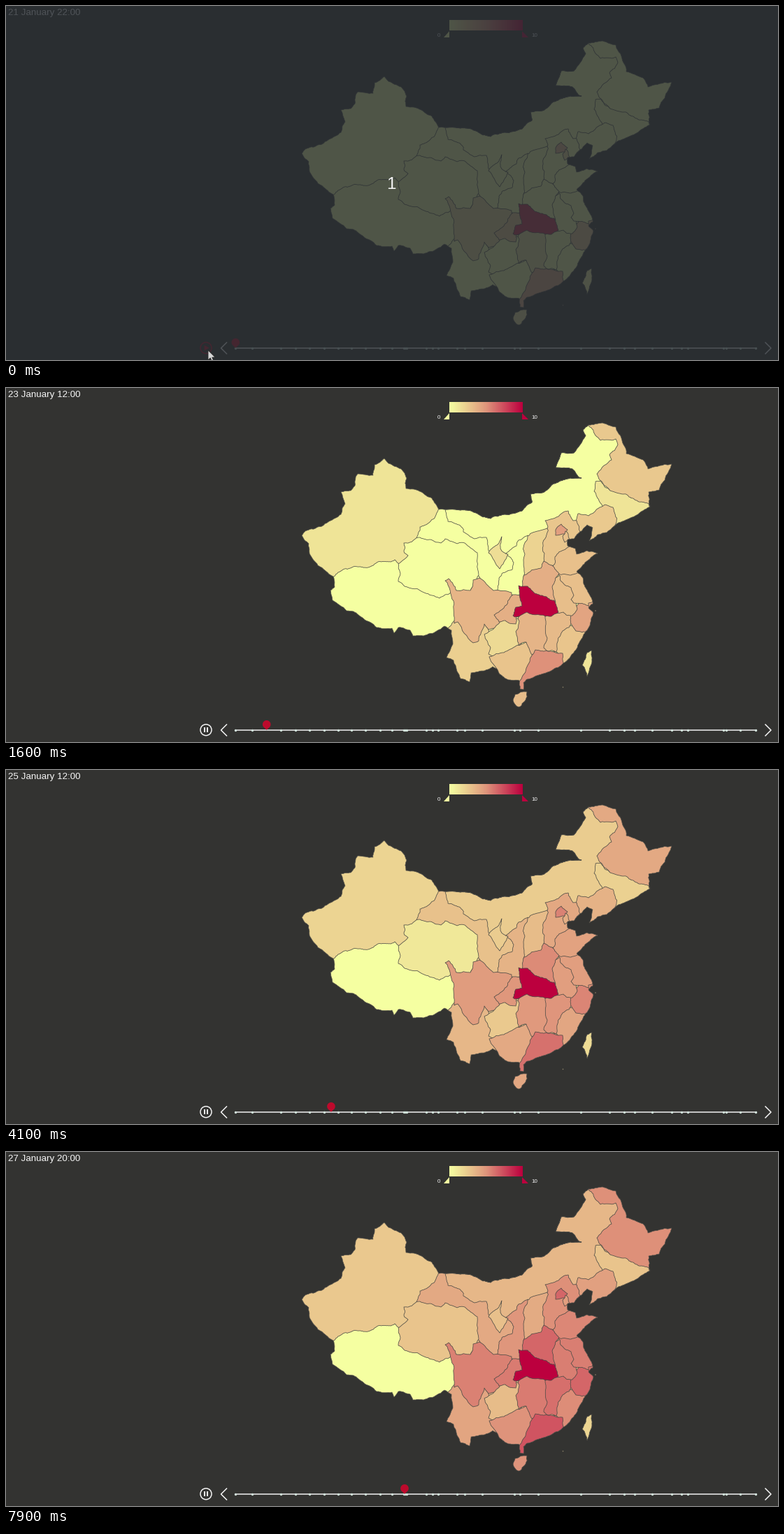
Recreate the animation shown at these times as a matplotlib script. Size 1104x507 px, loop 8 s.

```python
import numpy as np
import matplotlib.pyplot as plt
from matplotlib.animation import FuncAnimation
from matplotlib.colors import LinearSegmentedColormap
from matplotlib.patches import Circle, Polygon, Rectangle

W, H, DPI = 1104, 507, 64
PX = 72 / DPI
STEP_MS, FRAMES = 100, 80
BG, WHITE, RED, BORDER = "#333331", "#f4f4f4", "#bd0a2c", "#4b4a45"
INTRO = 2  # frames under the dark overlay

rng = np.random.default_rng(4)
CMAP = LinearSegmentedColormap.from_list("cases", ["#f5ffa1", "#df967c", "#bc003e"], N=512)

# Each move starts at a frame and carries the marker to an hour.
STARTS = (9, 15, 22, 27, 34, 40, 45, 53, 59, 65, 72, 78)
HOURS = (14, 38, 50, 62, 74, 86, 97, 109, 121, 131, 141, 142)
MOVE_STEPS = 3
LAST_HOUR = HOURS[-1]

# Key points of the mainland outline, clockwise from the western end
NORTH = [
    (423, 211), (428, 205), (446, 199), (462, 191), (479, 181), (485, 166),
    (479, 149), (493, 147), (499, 140), (503, 123), (525, 125), (527, 110),
    (541, 101), (547, 108), (565, 116), (573, 129), (572, 144), (594, 149),
    (609, 158), (619, 174), (650, 175), (665, 176), (679, 183), (693, 187),
    (713, 181), (738, 176), (752, 164), (750, 152), (767, 150), (777, 143),
    (791, 134), (807, 129), (823, 129), (810, 116), (786, 114), (794, 93),
    (812, 93), (829, 68), (825, 60), (833, 53)]
EAST = [
    (853, 50), (872, 56), (880, 72), (887, 94), (911, 103), (918, 116),
    (936, 111), (952, 109), (942, 132), (934, 146), (919, 149), (921, 170),
    (907, 178), (893, 186), (874, 194), (859, 207), (846, 210), (834, 219),
    (839, 200), (831, 196), (820, 207), (812, 216), (803, 217), (803, 226),
    (814, 230), (816, 238), (831, 233), (846, 237), (828, 250), (816, 263),
    (825, 272), (830, 288), (838, 303), (839, 309), (833, 315), (840, 322),
    (835, 340), (826, 353), (819, 366), (813, 377), (797, 394)]
SOUTH = [
    (790, 400), (772, 408), (753, 415), (740, 422), (740, 432), (735, 431),
    (734, 419), (719, 418), (708, 411), (702, 402), (696, 399), (684, 405),
    (665, 408), (663, 421), (650, 416), (644, 402), (640, 390), (630, 386),
    (639, 367), (637, 347), (627, 341), (611, 351), (597, 355), (582, 355),
    (578, 347), (561, 343), (555, 351), (552, 344), (530, 343), (511, 330),
    (497, 320), (487, 319), (467, 304), (464, 290), (470, 285), (468, 270),
    (446, 254), (434, 237), (433, 223)]
HAINAN = [(728, 439), (745, 435), (744, 444), (738, 452), (733, 457), (725, 447)]
TAIWAN = [(838, 376), (838, 391), (831, 413), (824, 397), (831, 379)]

# Provinces from back to front: hour of the first case, final value, key points.
# They overlap the ones behind them and are clipped at the mainland outline.
PROVINCES = {
    "Xinjiang": (16, 2.6, [
        (619, 174), (619, 90), (415, 90), (415, 275), (480, 280), (575, 275),
        (620, 215), (625, 190)]),
    "Gansu": (40, 4.1, [
        (619, 172), (628, 173), (632, 191), (648, 196), (654, 206), (670, 216),
        (687, 214), (690, 233), (728, 240), (730, 255), (712, 291), (695, 294),
        (640, 228), (590, 225), (586, 217), (592, 199), (613, 186)]),
    "Tibet": (0, 0, [
        (469, 270), (482, 260), (505, 256), (518, 257), (532, 249), (556, 246),
        (575, 270), (620, 285), (645, 290), (650, 330), (640, 346), (620, 370),
        (455, 370), (455, 275)]),
    "Qinghai": (80, 2.8, [
        (569, 222), (590, 214), (606, 217), (622, 222), (628, 216), (656, 222),
        (674, 236), (676, 268), (664, 291), (640, 290), (628, 296), (620, 301),
        (598, 293), (570, 284), (561, 277), (564, 266), (561, 252), (575, 240),
        (569, 234)]),
    "Shaanxi": (42, 5, [
        (746, 211), (755, 225), (755, 290), (728, 298), (703, 290), (709, 266),
        (724, 260), (726, 250), (715, 237), (730, 226), (733, 218)]),
    "Ningxia": (10, 3, [
        (709, 213), (707, 230), (718, 238), (711, 252), (706, 259), (690, 236),
        (702, 225)]),
    "Heilongjiang": (15, 5.2, [
        (835, 56), (830, 45), (960, 45), (955, 150), (919, 170), (880, 165),
        (851, 133), (845, 123), (866, 103), (863, 96), (875, 81), (872, 73),
        (850, 75)]),
    "Jilin": (20, 2.8, [
        (843, 134), (851, 134), (864, 147), (883, 152), (905, 163), (919, 166),
        (930, 185), (875, 205), (855, 172), (841, 148)]),
    "Liaoning": (4, 4.5, [
        (814, 195), (818, 180), (833, 183), (857, 167), (868, 171), (873, 192),
        (865, 225), (820, 225)]),
    "Hebei": (12, 5.2, [
        (771, 190), (790, 184), (804, 176), (811, 190), (816, 190), (821, 206),
        (810, 224), (800, 240), (784, 254), (766, 252), (764, 215), (775, 199)]),
    "Shanxi": (11, 4, [
        (774, 201), (768, 225), (770, 237), (768, 256), (760, 268), (740, 270),
        (742, 238), (741, 224), (746, 212), (764, 204)]),
    "Beijing": (-33, 6.6, [
        (786, 203), (794, 195), (803, 203), (799, 209), (786, 211)]),
    "Tianjin": (-14, 4.6, [
        (800, 205), (804, 209), (806, 217), (799, 221), (796, 212)]),
    "Yunnan": (11, 4.3, [
        (634, 342), (650, 325), (680, 328), (706, 382), (706, 402), (690, 430),
        (615, 430), (615, 380), (630, 352)]),
    "Sichuan": (-7, 5.7, [
        (633, 273), (644, 290), (664, 290), (668, 275), (677, 272), (697, 290),
        (723, 293), (726, 310), (712, 340), (690, 346), (684, 338), (676, 362),
        (668, 365), (646, 335), (641, 337), (640, 305), (628, 276)]),
    "Guizhou": (7, 3.2, [
        (684, 353), (698, 344), (709, 331), (736, 331), (737, 368), (728, 379),
        (704, 387), (690, 381), (693, 372)]),
    "Guangxi": (7, 5.1, [
        (691, 385), (712, 379), (730, 369), (745, 364), (760, 375), (753, 395),
        (742, 416), (737, 425), (705, 425), (702, 403), (698, 397)]),
    "Hunan": (-3, 5.9, [
        (732, 329), (745, 316), (775, 324), (779, 357), (772, 382), (752, 382),
        (744, 364), (733, 368), (729, 349)]),
    "Fujian": (12, 5.3, [
        (800, 338), (815, 343), (840, 345), (840, 360), (815, 395), (794, 400),
        (794, 382), (783, 377), (788, 355)]),
    "Guangdong": (-43, 7.2, [
        (757, 375), (773, 376), (796, 380), (799, 400), (790, 420), (735, 440),
        (733, 424), (738, 414), (752, 383)]),
    "Jiangxi": (12, 6.3, [
        (771, 326), (789, 318), (799, 318), (813, 326), (805, 343), (796, 348),
        (787, 378), (773, 376), (769, 372), (774, 358)]),
    "Zhejiang": (-18, 6.6, [
        (813, 316), (822, 306), (850, 306), (850, 347), (824, 350), (815, 348),
        (808, 338), (808, 326)]),
    "Anhui": (11, 5.8, [
        (785, 272), (792, 268), (803, 276), (815, 285), (815, 306), (817, 316),
        (810, 326), (797, 321), (786, 322), (782, 303), (778, 290)]),
    "Jiangsu": (12, 5.8, [
        (790, 265), (810, 263), (818, 260), (840, 270), (845, 307), (830, 311),
        (812, 308), (808, 303), (812, 297), (808, 286), (799, 282)]),
    "Shanghai": (-23, 6.2, [(833, 308), (845, 304), (845, 314), (834, 315)]),
    "Shandong": (8, 5.5, [
        (782, 255), (785, 242), (800, 231), (808, 222), (855, 228), (845, 250),
        (822, 264), (808, 268), (789, 267)]),
    "Henan": (2, 6.6, [
        (769, 248), (783, 256), (791, 266), (781, 285), (786, 307), (755, 302),
        (738, 286), (741, 268), (765, 258)]),
    "Chongqing": (-15, 5.9, [
        (725, 296), (742, 295), (742, 318), (730, 328), (729, 338), (714, 333),
        (705, 335), (698, 325), (712, 315)]),
    "Hubei": (-75, 13, [
        (733, 283), (741, 284), (756, 294), (773, 299), (784, 304), (790, 321),
        (780, 327), (763, 325), (745, 321), (730, 328), (725, 326), (729, 314),
        (738, 312), (734, 291)]),
}


def rough(points, amount=0.07):
    """Fractal outline: keep halving each edge and push its middle sideways."""
    pts = np.array(points, float)
    while True:
        edge = np.roll(pts, -1, axis=0) - pts
        length = np.hypot(*edge.T)
        if length.max() < 5:
            return pts
        push = rng.normal(0, amount, len(pts)) * np.minimum(length, 16)
        push[length < 3] = 0
        normal = np.c_[-edge[:, 1], edge[:, 0]] / length[:, None]
        middle = pts + edge / 2 + normal * push[:, None]
        pts = np.stack([pts, middle], axis=1).reshape(-1, 2)


def value(hour, onset, final):
    """Fast growth after the first case that slows down later."""
    x = np.clip((hour - onset) / (LAST_HOUR - onset), 0, 1)
    return min(10, final * x ** 0.4)


def hour_x(hour):
    return 328.3 + 1.708 * hour


def date_label(hour):
    days, clock = divmod(22 + hour, 24)
    return f"{21 + days} January {clock:02d}:00"


def ease(t):
    return 4 * t ** 3 if t < 0.5 else 1 - (2 - 2 * t) ** 3 / 2


def state(frame):
    """Hour shown on the map and the marker's place on the hour scale."""
    hour = marker = 0
    for start, goal in zip(STARTS, HOURS):
        if frame < start:
            break
        t = min(1, (frame - start) / (MOVE_STEPS - 1))
        marker = hour + (goal - hour) * ease(t)
        hour = goal
    return hour, marker


fig = plt.figure(figsize=(W / DPI, H / DPI), dpi=DPI, facecolor=BG)
ax = fig.add_axes([0, 0, 1, 1])
ax.axis("off")


def label(x, y, text, size, **kw):
    return ax.text(x, y, text, fontsize=size * PX, color=WHITE,
                   family="Liberation Sans", **kw)


def stroke(xs, ys):
    ax.plot(xs, ys, color=WHITE, lw=1.5 * PX)


def shape(points, color, **kw):
    return ax.add_patch(Polygon(points, closed=True, fc=color, **kw))


def land(points, onset, final, clip=None):
    patch = shape(points, BG, ec=BORDER, lw=0.75 * PX, joinstyle="round")
    if clip is not None:
        patch.set_clip_path(clip)
    lands.append((patch, onset, final))
    return patch


# Map: the mainland itself carries the colour of Inner Mongolia
lands = []
coast = rough(NORTH + EAST + SOUTH, 0.05)
mainland = land(coast, 45, 3.4)
for onset, final, outline in PROVINCES.values():
    land(rough(outline), onset, final, mainland)
shape(coast, "none", ec=BORDER, lw=0.6 * PX)
land(rough(HAINAN), -6, 5.1)
land(rough(TAIWAN), -14, 2)
for x, y in [(796.5, 428.5), (843, 319)]:
    ax.add_patch(Circle((x, y), 0.8, fc="#8b8069", lw=0))

# Colour legend
ramp = CMAP(np.linspace(0, 1, 105))[None, :, :3]
ax.imshow(ramp, extent=(634, 738.5, 35.5, 21), aspect="auto",
          interpolation="bilinear")
for x, out, end in [(634, -8.5, 0.0), (738, 8.5, 1.0)]:
    shape([(x, 36), (x, 44.5), (x + out, 44.5)], CMAP(end), lw=0)
label(618.5, 43.5, "0", 8, ha="center")
label(755.8, 43.5, "10", 8, ha="center")
date = label(3, 12.5, "", 13.4)

# Timeline
stroke([327.5, 1073], [490, 490])
later = [573, 601, 610, 618, 645, 656, 681, 727, 735, 761, 822, 863, 884, 899,
         924, 952, 966, 975, 1026, 1030, 1050, 1072]
ticks = [hour_x(h) for h in (0,) + HOURS] + later
ax.plot(ticks, [490] * len(ticks), "o", ms=3.4 * PX, mew=0, color="#cfe0d8")
stroke([315.5, 307.5, 315.5], [482, 490, 498])
stroke([1086, 1094, 1086], [482, 490, 498])
arc = np.radians(np.linspace(145, 395, 30))
pin = np.vstack([np.c_[5.8 * np.cos(arc), 481.8 + 5.8 * np.sin(arc)],
                 [(5, 485), (0, 489.8), (-5, 485)]])
pin = pin[np.argsort(np.arctan2(pin[:, 1] - 482, pin[:, 0]))]
marker_pin = shape(pin, RED, lw=0, zorder=4)

# Play / pause button
ring = ax.add_patch(Circle((286, 489.7), 8, fill=False, lw=1.5 * PX))
bars = [ax.add_patch(Rectangle((x, 486.2), 1.6, 7, lw=0))
        for x in (283.4, 287.1)]
play = shape([(283.6, 485.7), (290.6, 489.7), (283.6, 493.7)], RED, lw=0)

# Intro overlay and mouse pointer
overlay = ax.add_patch(Rectangle((0, 0), W, H, lw=0, alpha=0.81, zorder=5,
                                 fc=(40 / 255, 45 / 255, 50 / 255)))
count = label(551, 262, "1", 24, ha="center", zorder=6)
arrow = np.array([(0, 0), (0, 14), (3.3, 11), (5.6, 16.5), (8, 15.5),
                  (5.7, 10.2), (10, 10)])
cursor = shape(arrow, "#d6d6d6", ec="#2a2a2a", lw=0.8 * PX, zorder=7)

ax.set_xlim(0, W)
ax.set_ylim(H, 0)


def draw(frame):
    hour, marker = state(frame)
    intro, playing = frame < INTRO, frame >= STARTS[0]
    for patch, onset, final in lands:
        patch.set_facecolor(CMAP(value(hour, onset, final) / 10))
    date.set_text(date_label(hour))
    marker_pin.set_xy(pin + (hour_x(marker), 0))

    button = WHITE if playing else RED
    ring.set_edgecolor(button)
    for bar in bars:
        bar.set_facecolor(button)
        bar.set_visible(not intro)
    for part in (play, overlay, count):
        part.set_visible(intro)

    tip = (289, 493) if intro else (236, 444) if playing else (287, 486)
    cursor.set_xy(arrow + tip)
    cursor.set_visible(frame <= STARTS[0])
    return []


anim = FuncAnimation(fig, draw, frames=FRAMES, interval=STEP_MS, repeat=True)
plt.show()
```
